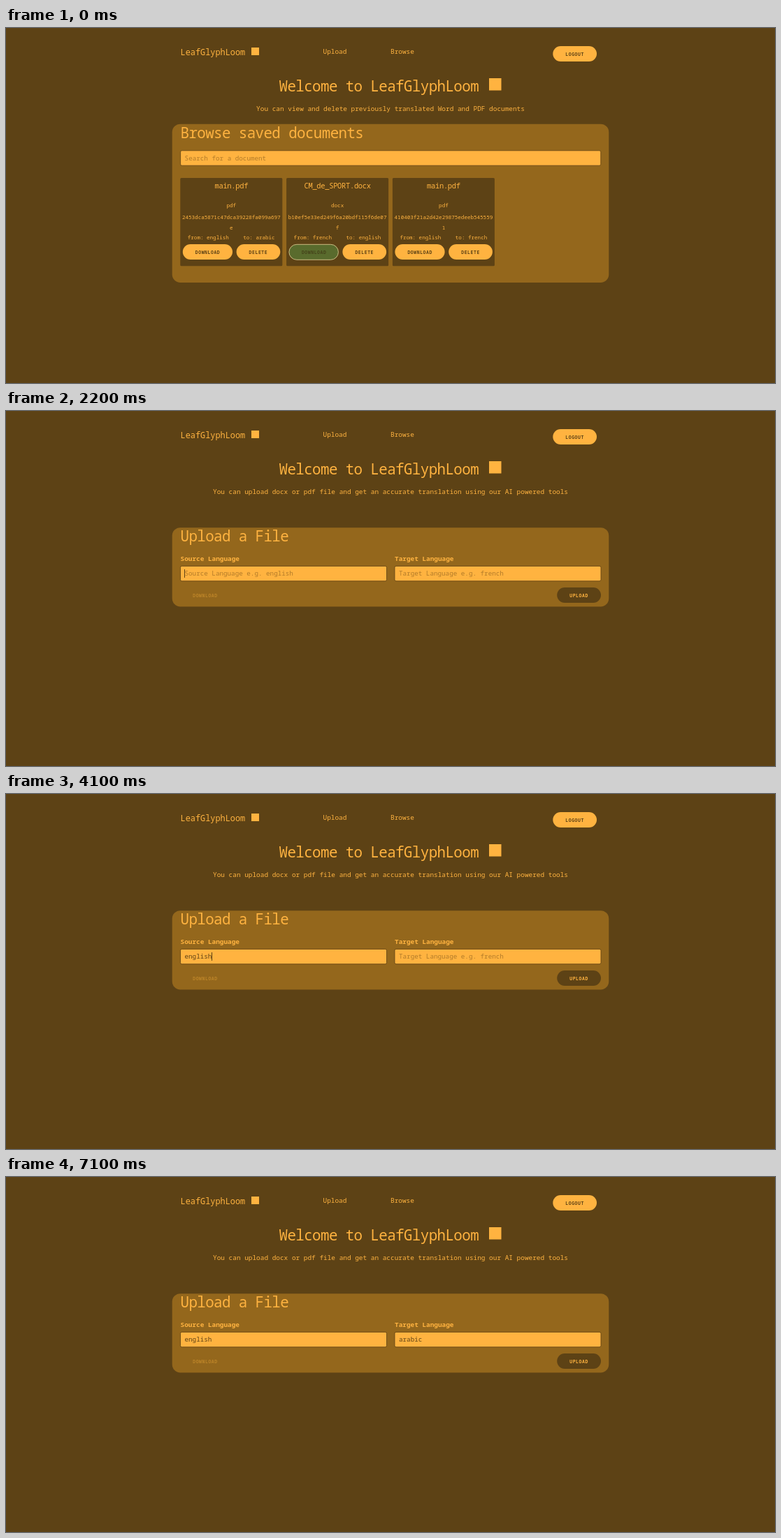
An HTML page with a canvas that plays this animation: 1100x509 px, repeating every 8 s.

```html
<!DOCTYPE html>
<html lang="en">
<head>
<meta charset="utf-8">
<title>Document translation</title>
<style>
  html, body { margin: 0; width: 100%; height: 100%; overflow: hidden; background: #5d4215; }
  canvas { display: block; width: 1100px; height: 509px; }
</style>
</head>
<body>
<canvas id="stage"></canvas>
<script>
const W = 1100, H = 509, LOOP = 8000;
const DARK = '#5d4215', PANEL = '#94671c', GOLD = '#ffb340', HINT = '#b27b29';
const BRAND = 'LeafGlyphLoom';
const FONT = '"Noto Sans Mono", "DejaVu Sans Mono", monospace';

const canvas = document.getElementById('stage');
const ctx = canvas.getContext('2d');
const dpr = window.devicePixelRatio || 1;
canvas.width = W * dpr;
canvas.height = H * dpr;

// Text styles: size, weight, letter spacing
const STYLE = {
  brand:  [11.9, 400, 0],
  title:  [20.84, 300, -0.6],
  body:   [9.42, 400, 0],
  label:  [9.4, 600, 0],
  input:  [9.26, 400, 0],
  card:   [10.42, 400, -0.29],
  small:  [7.57, 400, 0],
  button: [6.37, 600, 0.62]
};

const CARDS = [
  { name: 'main.pdf', type: 'pdf', id: '2453dca5871c47dca39228fa099a697e', from: 'english', to: 'arabic' },
  { name: 'CM_de_SPORT.docx', type: 'docx', id: 'b10ef5e33ed249f6a20bdf115f6de07f', from: 'french', to: 'english' },
  { name: 'main.pdf', type: 'pdf', id: '410403f21a2d42e29875edeeb5455591', from: 'english', to: 'french' }
];

// Typing steps: time, letters in field, caret shown
const SOURCE = { x: 249.5, text: 'english', hint: 'Source Language e.g. english', caret: 255.7, steps: [
  [2200, 0, 1], [2900, 1, 1], [3000, 2, 1], [3400, 3, 0], [3500, 4, 1],
  [3800, 5, 1], [3900, 6, 1], [4100, 7, 1], [4600, 7, 0]
] };
const TARGET = { x: 556, text: 'arabic', hint: 'Target Language e.g. french', caret: 562.45, steps: [
  [4600, 0, 1], [5200, 1, 1], [5400, 2, 1], [5600, 3, 1], [5900, 3, 0],
  [6300, 4, 1], [6800, 5, 1], [7000, 6, 1], [7100, 6, 0]
] };

function text(str, x, y, style, color = GOLD, align = 'left') {
  const [size, weight, spacing] = STYLE[style];
  ctx.font = `${weight} ${size}px ${FONT}`;
  ctx.letterSpacing = spacing + 'px';
  ctx.textAlign = align;
  ctx.fillStyle = color;
  ctx.fillText(str, x, y);
}

function box(x, y, w, h, r, fill, stroke) {
  ctx.beginPath();
  ctx.roundRect(x, y, w, h, r);
  ctx.fillStyle = fill;
  ctx.fill();
  if (!stroke) return;
  ctx.strokeStyle = stroke;
  ctx.lineWidth = 0.8;
  ctx.stroke();
}

function button(label, x, y, w, fill = GOLD, color = DARK, border) {
  box(x, y, w, 22, 11, fill, border);
  text(label, x + 18, y + 13.7, 'button', color);
}

function input(x, y, w, value, hint) {
  box(x, y, w, 21.4, 2, GOLD, DARK);
  text(value || hint, x + 6, y + 13.9, 'input', value ? DARK : HINT);
}

function header(t) {
  text(BRAND, 249.5, 39.2, 'brand');
  box(351, 28, 11, 11, 0, GOLD);
  text('Upload', 453.5, 37, 'body', t >= 100 && t < 1000 ? '#6b6960' : GOLD);
  text('Browse', 550, 37, 'body');
  button('LOGOUT', 782.3, 26, 62.7);
  text('Welcome to ' + BRAND, 390.5, 91, 'title');
  box(691, 72, 17.5, 17.5, 0, GOLD);
}

function card(doc, x, hover) {
  const mid = x + 73;
  box(x, 215, 146, 126.3, 1.5, DARK);
  text(doc.name, mid, 230, 'card', GOLD, 'center');
  text(doc.type, mid, 256.5, 'small', GOLD, 'center');
  text(doc.id.slice(0, 31), mid, 274.3, 'small', GOLD, 'center');
  text(doc.id.slice(31), mid, 288.8, 'small', GOLD, 'center');
  text('from: ' + doc.from, x + 10.5, 303.3, 'small');
  text('to: ' + doc.to, x + 135.3, 303.3, 'small', GOLD, 'right');
  if (hover) button('DOWNLOAD', x + 3.8, 310.3, 70.5, '#596b2d', '#45431a', '#e6d39a');
  else button('DOWNLOAD', x + 3.5, 310, 71.2);
  button('DELETE', x + 80.3, 310, 62.7);
}

function browsePage(t) {
  text('You can view and delete previously translated Word and PDF documents', 550, 118.6, 'body', GOLD, 'center');
  box(237.7, 137.7, 624.6, 227.2, 11.6, PANEL);
  text('Browse saved documents', 249.5, 157.8, 'title');
  input(249.6, 175.8, 601.2, '', 'Search for a document');
  CARDS.forEach((doc, i) => card(doc, 249.3 + i * 151.8, i === 1 && t < 600));
}

function field(f, t) {
  const [, count, caret] = f.steps.filter(s => s[0] <= t).pop() || [0, 0, 0];
  input(f.x, 222.4, 295, f.text.slice(0, count), f.hint);
  if (!caret) return;
  ctx.fillStyle = DARK;
  ctx.fillRect(Math.floor(f.caret + count * 5.556), 227, 1, 12);
}

function uploadPage(t) {
  text('You can upload docx or pdf file and get an accurate translation using our AI powered tools', 550, 118.6, 'body', GOLD, 'center');
  box(237.7, 167.2, 624.6, 113.2, 11.6, PANEL);
  text('Upload a File', 249.5, 187.3, 'title');
  text('Source Language', 249.5, 215.3, 'label');
  text('Target Language', 556, 215.3, 'label');
  field(SOURCE, t);
  field(TARGET, t);
  text('DOWNLOAD', 267.2, 266.7, 'button', '#bd8529');
  button('UPLOAD', 788.2, 253, 62.8, DARK, GOLD);
}

function draw(now) {
  const t = now % LOOP;
  ctx.setTransform(dpr, 0, 0, dpr, 0, 0);
  ctx.fillStyle = DARK;
  ctx.fillRect(0, 0, W, H);
  header(t);
  if (t < 800) browsePage(t);
  else uploadPage(t);
}

const start = performance.now();
function tick() {
  draw(performance.now() - start);
  requestAnimationFrame(tick);
}
tick();
</script>
</body>
</html>
```
